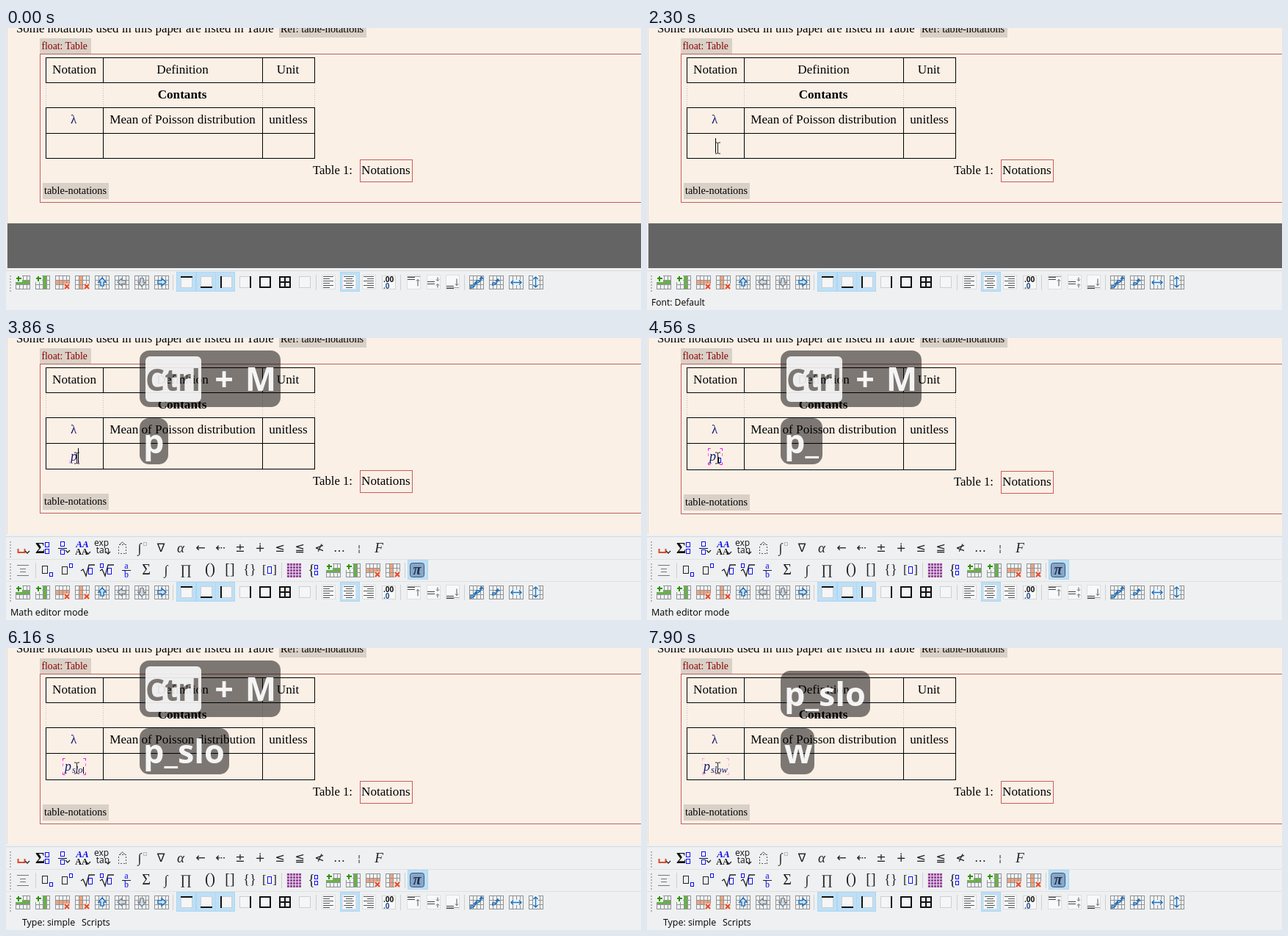
Write an HTML page that moves like this. It is 865 by 384 pixels and loops after 8 s.

```html
<!DOCTYPE html>
<html>
<head>
<meta charset="utf-8">
<style>
html, body { margin: 0; width: 100%; height: 100%; overflow: hidden; background: #f0f0f0; }
svg { display: block; width: 865px; height: 384px; }
text { white-space: pre; }
.serif { font-family: "Liberation Serif", serif; }
.math { font-family: "Liberation Serif", "DejaVu Serif", "DejaVu Sans", serif; }
.sign { font-family: "DejaVu Sans", sans-serif; }
.ui { font-family: "Open Sans", sans-serif; }
rect, .crisp { shape-rendering: crispEdges; }
.round { shape-rendering: auto; }
</style>
</head>
<body>
<svg id="stage" viewBox="0 0 865 384" xmlns="http://www.w3.org/2000/svg"></svg>
<script>
const LOOP = 8000;
const PAPER = '#faf0e6', FRAME = '#cd5c5c', LABEL = '#d9d1c8', NAVY = '#191970', BLUE = '#0808f4';
const BAR = '#eff0f1', GREY = '#858585', GREEN = '#62b53a', ORANGE = '#f2a27c', RED = '#dd4a2c', ARROW = '#2370b5';

const rect = (x, y, w, h, fill, more = '') =>
  `<rect x="${x}" y="${y}" width="${w}" height="${h}" fill="${fill}" ${more}/>`;
const box = (x, y, w, h, color, fill = 'none', line = 1) =>
  rect(x + line / 2, y + line / 2, w - line, h - line, fill, `stroke="${color}" stroke-width="${line}"`);
const text = (x, y, size, str, fill = '#000', cls = 'serif', more = '') =>
  `<text x="${x}" y="${y}" font-size="${size}" fill="${fill}" class="${cls}" ${more}>${str}</text>`;
const mid = (x, y, size, str, fill = '#222', cls = 'math', more = '') =>
  text(x, y, size, str, fill, cls, 'text-anchor="middle" ' + more);
const path = (d, color, w = 1, fill = 'none') =>
  `<path d="${d}" stroke="${color}" stroke-width="${w}" fill="${fill}"/>`;
const group = (id, body, more = '') => `<g id="${id}" ${more}>${body}</g>`;
const range = (n, fn) => Array.from({ length: n }, (_, i) => fn(i)).join('');

// ---------- toolbar icons, each centred on x, y ----------
function grid(x, y, row = -1, col = -1, color = '') {
  const l = x - 10, t = y - 9;
  let s = rect(l, t, 20, 19, '#f1f3f4');
  if (row >= 0) s += rect(l, t + row * 6, 20, 7, color);
  if (col >= 0) s += rect(l + col * 5, t, 6, 19, color);
  s += range(5, i => rect(l + i * 5 - (i > 3), t, 1, 19, '#8f9396'));
  return s + range(4, i => rect(l, t + i * 6, 20, 1, '#8f9396'));
}
const plus = (x, y) => rect(x - 4, y - 4, 9, 9, '#edf4ea') + rect(x - 1, y - 3, 2, 7, '#2f8f12') + rect(x - 3, y - 1, 7, 2, '#2f8f12');
const cross = (x, y) => rect(x - 4, y - 3, 8, 8, '#f6dcd3') + path(`M${x - 3} ${y - 2}l6 6m0-6l-6 6`, RED, 1.8);
const arrow = (x, y, turn, color) =>
  `<path transform="translate(${x} ${y}) rotate(${turn}) scale(.85)" d="M0-7L6 0H2.5V6H-2.5V0H-6Z" fill="#cfe2f4" stroke="${color}" stroke-width="1.7"/>`;
const addRow = (x, y) => grid(x, y, 1, -1, GREEN) + plus(x - 6, y - 5);
const addCol = (x, y) => grid(x, y, -1, 2, GREEN) + plus(x - 6, y - 5);
const delRow = (x, y) => grid(x, y, 1, -1, ORANGE) + cross(x + 6, y + 5);
const delCol = (x, y) => grid(x, y, -1, 1, ORANGE) + cross(x + 6, y + 5);
const move = (x, y, turn, color) => grid(x, y) + arrow(x, y, turn, color);
const slot = (x, y, w = 6, h = 8) => box(x, y, w, h, BLUE, '#fff');
const drop = (x, y) => path(`M${x - 3} ${y - 1}l3 3l3-3`, '#222', 1.3);
const press = (x, y, w = 27) => box(x - 13, y - 14, w, 27, '#abd8f5', '#bfdff5');
const split = (x, y) => rect(x, y - 10, 1, 21, '#cfcfcf');
const handle = y => range(6, i => rect(5, y - 9 + i * 4, 2, 2, '#b5b5b5'));
const sheet = (x, y) => box(x - 9, y - 10, 19, 20, '#dcdfe1', '#f8f9fa');

function edges(x, y, sides) {
  const l = x - 8, t = y - 8;
  let s = box(l, t, 16, 16, '#c9d0d6', '#f6f6f6');
  if (sides.includes('t')) s += rect(l, t, 16, 2, '#111');
  if (sides.includes('b')) s += rect(l, t + 14, 16, 2, '#111');
  if (sides.includes('l')) s += rect(l, t, 2, 16, '#111');
  if (sides.includes('r')) s += rect(l + 14, t, 2, 16, '#111');
  if (sides.includes('+')) s += rect(x - 1, t, 2, 16, '#111') + rect(l, y - 1, 16, 2, '#111');
  return s;
}
const align = (x, y, k) => sheet(x, y) + range(6, i => {
  const w = [14, 9, 14, 9, 14, 9][i];
  return rect(x - 7 + Math.round((14 - w) * k), y - 8 + i * 3, w, 1, '#555');
});
function valign(x, y, k) {
  const t = y - 8 + k * 6;
  const tip = k === 0 ? 'M6-4v9M4-2l2-2l2 2' : k === 1 ? 'M6-7v4m-2-1l2 2l2-2M6 7v-4m-2 1l2-2l2 2' : 'M6-5v9M4 2l2 2l2-2';
  return sheet(x, y) + rect(x - 8, t + 1, 10, 1, '#444') + rect(x - 8, t + 4, 10, 1, '#444') +
    (k === 1 ? '' : rect(x - 8, k ? y + 7 : y - 8, 17, 1, '#999')) +
    `<g transform="translate(${x} ${y + .5})">${path(tip, '#555')}</g>`;
}
const twist = (x, y) => path(`M${x - 6} ${y + 5}v-4h4m-4 3q5 0 7-7m-3 2l3-3l2 3`, ARROW, 1.5);
const stretch = (x, y, turn) =>
  `<g transform="rotate(${turn} ${x} ${y})">${rect(x - 9, y - 3, 18, 7, '#eaf3fb')}${path(`M${x - 7} ${y + .5}h14m-11-3l-3 3l3 3m8-6l3 3l-3 3`, ARROW, 1.4)}</g>`;

function tableBar() {
  const y = 346;
  let s = handle(y) + addRow(23, y) + addCol(50, y) + delRow(77, y) + delCol(104, y);
  s += move(131, y, 0, ARROW) + move(158, y, -90, GREY) + move(185, y, 180, GREY) + move(212, y, 90, ARROW);
  s += split(227, y) + [246, 273, 299].map(x => press(x - 1, y)).join('') + press(468, y);
  ['t', 'b', 'l', 'r', 'tblr', 'tblr+', ''].forEach((e, i) => s += edges(246 + Math.round(i * 26.8), y, e));
  s += split(422, y) + align(439, y, 0) + align(467, y, .5) + align(494, y, 1);
  s += box(512, 337, 19, 19, '#d4d4d4', '#f8f8f8') + text(514, 346, 10, '.00', '#111', 'ui', 'font-weight="700"') +
    text(514, 355, 10, '.0', '#24508c', 'ui', 'font-weight="700"');
  s += split(537, y) + valign(555, y, 0) + valign(582, y, 1) + valign(608, y, 2) + split(624, y);
  s += grid(641, y) + twist(639, y + 4) + twist(647, y - 3) + grid(668, y) + twist(669, y);
  return s + grid(695, y) + stretch(695, y, 0) + grid(722, y) + stretch(722, y, 90);
}

function mathBar() {
  const y = 316;
  let s = handle(y);
  s += [[-7, 16], [-2, 8], [2, 8], [7, 16]].map(([d, w]) => rect(23 - w / 2, y + d, w, 1, '#777')).join('') + split(40, y);
  s += box(49, 310, 8, 11, '#222') + slot(59, 319, 5, 6) + box(76, 311, 8, 11, '#222') + slot(86, 307, 5, 6);
  s += path('M102 317l3-2l4 9l4-15h8', '#222', 1.3) + slot(112, 313, 6, 9);
  s += path('M128 317l3-2l4 9l4-15h8', '#222', 1.3) + slot(138, 313, 6, 9) + slot(128, 307, 5, 6);
  s += mid(164, 314, 12, 'a', BLUE) + rect(158, 316, 12, 1, '#222') + mid(164, 326, 12, 'b', BLUE);
  s += mid(191, 322, 20, 'Σ') + mid(218, 322, 18, '∫') + mid(245, 322, 19, '∏');
  s += mid(278, 321, 21, '()') + mid(305, 321, 20, '[]') + mid(332, 321, 18, '{}') + mid(359, 321, 17, '[&#8194;]') + slot(356, 311, 6, 10);
  s += split(375, y) + rect(382, 306, 20, 20, '#ead9ec') + range(25, i => rect(383 + i % 5 * 4, 307 + Math.floor(i / 5) * 4, 3, 3, '#934a9a'));
  s += mid(416, 322, 20, '{') + slot(420, 309, 5, 6) + slot(420, 317, 5, 6);
  s += addRow(446, y) + addCol(473, y) + delRow(500, y) + delCol(527, y) + split(543, y);
  s += group('hot', press(560, 316, 28)) +
    `<rect class="round" x="550.5" y="306.5" width="19" height="19" rx="3" fill="#87a6c8" stroke="#3b5878"/>` +
    mid(560, 322, 20, 'π', '#1d2f4c', 'math', 'font-weight="700" font-style="italic"');
  return s;
}

function panelBar() {
  const y = 286;
  let s = handle(y) + path('M16.5 287v5h9v-5', RED, 2) + drop(29, 291);
  s += text(40, 293, 20, 'Σ', '#111', 'math', 'font-weight="700"') + slot(53, 278, 6, 7) + slot(53, 287, 6, 7);
  s += slot(74, 277, 6, 7) + rect(71, 286, 12, 1, '#111') + slot(74, 288, 6, 7) + drop(84, 290);
  s += mid(104, 285, 13, 'AA', BLUE, 'serif', 'font-style="italic" font-weight="700"') + mid(103, 295, 12, 'AA', '#111', 'serif', 'font-weight="700"') + drop(112, 292);
  s += mid(130, 283, 12, 'exp', '#111', 'ui') + mid(132, 293, 12, 'tan', '#111', 'ui') + drop(139, 292);
  s += rect(153.5, 281.5, 10, 12, 'none', 'stroke="#555" stroke-dasharray="2 2"') + path('M155 281l3.500-3l3.500 3', '#555');
  s += mid(182, 292, 18, '∫') + box(187, 278, 5, 5, '#bbb');
  const signs = ['∇', 'α', '←', '⇠', '±', '∔', '≤', '≦', '≮', '…', '¦', 'F'];
  signs.forEach((c, i) => s += c === 'α' || c === 'F' ? mid(211 + i * 27, 292, 19, c, '#222', 'math', 'font-style="italic"')
    : mid(211 + i * 27, 291, c === '¦' ? 12 : 16, c, '#222', 'sign'));
  return s;
}

// ---------- document ----------
function page() {
  let s = rect(0, 0, 865, 327, PAPER);
  s += text(14, 6, 16.85, 'Some notations used in this paper are listed in Table') + rect(372, 0, 119, 13, LABEL) + text(374, 6, 14.3, 'Ref: table-notations');
  s += rect(46, 14, 70, 21, LABEL) + text(48.5, 29, 13.7, 'float: Table', '#8b0000');
  s += rect(46, 35, 819, 1, '#c0605e');
  s += box(54, 40, 367, 35, '#000') + rect(54, 108, 367, 1, '#000') + rect(54, 143, 367, 1, '#000');
  [54, 132, 349, 420].forEach(x => {
    s += rect(x, 40, 1, 35, '#000') + `<path class="crisp" d="M${x + .5} 76v32" stroke="#b9bccb" stroke-dasharray="1 2"/>`;
  });
  const cell = (x, y, str, more) => mid(x, y, 17.15, str, '#000', 'serif', more);
  s += cell(93, 62, 'Notation') + cell(240.5, 62, 'Definition') + cell(384, 62, 'Unit');
  s += cell(240, 96, 'Contants', 'font-weight="700"');
  s += cell(240.5, 130, 'Mean of Poisson distribution') + cell(384.5, 130, 'unitless');
  return s + mid(92, 130, 17, 'λ', NAVY);
}
const tail = () => rect(54, 177, 367, 1, '#000') + rect(46, 237, 819, 1, '#c0605e') +
  text(418, 199, 16.7, 'Table 1:') + box(482, 179, 72, 31, FRAME) + text(484, 199, 17.15, 'Notations') +
  rect(50, 211, 90, 22, LABEL) + text(52, 226, 14.3, 'table-notations');

const bars = y => rect(0, y, 865, 384 - y, BAR) + rect(0, y + 3, 865, 1, '#d6d8d9');
const beam = path('M-3.500-7.500h2.500l1 1l1-1h2.500M0-6.500v13M-3.500 7.500h2.500l1-1l1 1h2.500', '#222');
const cutout = '<mask id="cut" maskUnits="userSpaceOnUse" x="0" y="0" width="200" height="80">' +
  rect(0, 0, 200, 80, '#fff') + text(8, 55, 41, 'Ctrl', '#000', 'ui', 'font-weight="700"') + '</mask>';

document.getElementById('stage').innerHTML = cutout + page() + group('lines', '') + group('tail', tail()) +
  rect(0, 0, 1, 327, '#f0f0f0') + rect(1, 0, 1, 327, '#e2dcd6') +
  group('plain', rect(2, 266, 863, 61, '#646464') + bars(327)) +
  group('rich', bars(267) + rect(0, 301, 865, 1, '#dfe1e2') + rect(0, 331, 865, 1, '#dfe1e2') + panelBar() + mathBar()) +
  tableBar() + group('status', '') + group('formula', '') + group('click', '<circle cx="94" cy="163" r="12" fill="#ff0" fill-opacity=".47"/>') +
  group('pointer', beam) + group('keys', '');

const $ = id => document.getElementById(id);
const put = (id, html) => { if ($(id).shown !== html) { $(id).shown = html; $(id).innerHTML = html; } };
const show = (id, on) => $(id).setAttribute('visibility', on ? 'visible' : 'hidden');

// ---------- key overlay ----------
const WIDTHS = { p: 39, p_: 57, p_s: 80, p_sl: 94, p_slo: 122, w: 46 };
const pad = (w, h) => `<rect class="round" width="${w}" height="${h}" rx="13" fill="#000" fill-opacity=".5"/>`;
const bold = 'font-weight="700" fill-opacity=".93"';
const at = (y, body, alpha = 1) => `<g transform="translate(182 ${y})" opacity="${alpha}">${body}</g>`;
const typed = (str, y) => at(y, pad(WIDTHS[str], 63) + text(5, 48, 45, str, '#fff', 'ui', bold));
const combo = (y, alpha) => at(y, pad(192, 77) +
  '<rect class="round" x="8" y="8" width="76" height="62" rx="6" fill="#fff" fill-opacity=".88" mask="url(#cut)"/>' +
  mid(115, 55, 45, '+', '#fff', 'ui', bold) + mid(165, 55, 45, 'M', '#fff', 'ui', bold), alpha);

function keys(t) {
  if (t < 2810) return '';
  if (t < 3860) return combo(95);
  if (t < 7400) return combo(17) + typed(word(t), 109);
  const fade = t < 7780 ? 1 : t < 7840 ? .66 : t < 7900 ? .33 : 0;
  return (fade ? combo(-61, fade) : '') + typed('p_slo', 31) + typed('w', 109);
}
const word = t => t < 4560 ? 'p' : t < 5550 ? 'p_' : t < 5780 ? 'p_s' : t < 6160 ? 'p_sl' : 'p_slo';

// ---------- formula in the last row ----------
const italic = (x, y, size, str) => text(x, y, size, str, NAVY, 'serif', 'font-style="italic"');
function corners(l, r, color) {
  return path(`M${l + 3.5} 150.500h-3v3M${r - 3.5} 150.500h3v3M${l + 3.5} 172.500h-3v-3M${r - 3.5} 172.500h3v-3`, color) +
    path(`M${l + .5} 157v4M${r - .5} 157v4`, color, .6);
}
const sub = (l, r, x, str) => italic(x, 167, 18, 'p') + italic(x + 10, 170, 12.5, str) + corners(l, r, r > 110 ? '#f3a4e4' : '#f0e');
const caret = (x, small) => small ? rect(x, 162, 1, 9, '#000') : rect(x, 150, 1, 20, '#000');
const within = (t, a, b) => t >= a && t < b;

function formula(t) {
  if (t < 2810) return within(t, 1060, 1800) || t >= 2300 ? caret(93) : '';
  if (t < 3860) return slot(89, 153, 7, 12) + (t < 3370 ? rect(91, 150, 1, 20, BLUE) : '');
  if (t < 4560) return italic(88, 167, 18, 'p') + path('M86.500 167v3.500h3M99.500 167v3.500h-3', '#f3a4e4') + caret(98);
  if (t < 5550) return sub(83, 103, 85, '') + slot(96, 163, 5, 7) + (t < 5100 ? caret(97, 1) : '');
  if (t < 5780) return sub(82, 104, 85, 's') + caret(101, 1);
  if (t < 6160) return sub(80, 106, 82, 'sl') + caret(101, 1);
  if (t < 7400) return sub(77, 109, 80, 'slo') + (within(t, 6720, 7220) ? '' : caret(105, 1));
  return sub(75, 112, 77, 'slow') + (t < 7900 ? caret(109, 1) : '');
}

function status(t) {
  if (t < 960) return '';
  if (t < 2810) return text(6, 378, 12.1, 'Font: Default', '#000', 'ui');
  if (t < 5910) return text(6, 378, 12.6, 'Math editor mode', '#000', 'ui');
  return text(22, 378, 12.4, 'Type: simple', '#000', 'ui') + text(103, 378, 12.4, 'Scripts', '#000', 'ui');
}

function draw(t) {
  const rich = t >= 2810, shift = !rich ? 0 : t < 4560 ? 1 : 2;
  show('plain', !rich);
  show('rich', rich);
  show('hot', t >= 3860);
  put('lines', rect(46, 35, 1, 203 + shift, FRAME) + [54, 132, 349, 420].map(x => rect(x, 108, 1, 70 + shift, '#000')).join(''));
  $('tail').setAttribute('transform', `translate(0 ${shift})`);
  put('status', status(t));
  put('formula', formula(t));
  put('keys', keys(t));
  show('click', within(t, 1060, 1240));
  show('pointer', t >= 240);
  const k = Math.min(1, Math.max(0, Math.floor((t - 240) / 68) / 11));
  const e = k * k * (3 - 2 * k);
  $('pointer').setAttribute('transform', `translate(${Math.round(475 - 379 * e) + .5} ${Math.round(23 + 140 * e) + .5})`);
  // "hot" sits inside "rich", so it must not outlive its parent
  if (!rich) show('hot', false);
}

const start = performance.now();
function tick() {
  draw((performance.now() - start) % LOOP);
  requestAnimationFrame(tick);
}
tick();
</script>
</body>
</html>
```
